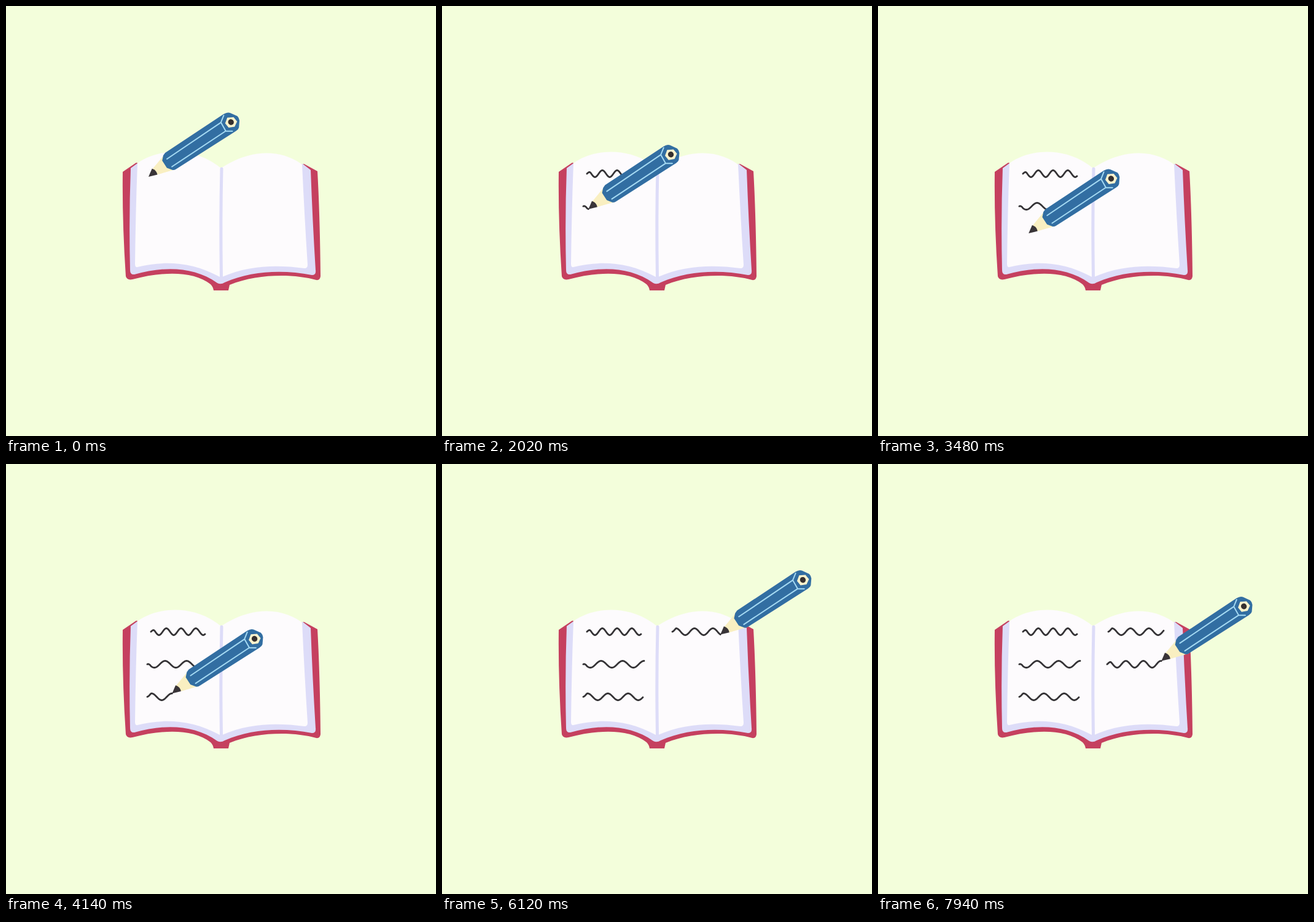
An HTML page that plays this animation: 700 px wide and 700 px high, repeating every 8 s.

```html
<!DOCTYPE html>
<html lang="en">
<head>
<meta charset="utf-8">
<title>Writing in a notebook</title>
<style>
  html, body { margin: 0; height: 100%; overflow: hidden; background: #f3fedb; }
  svg { display: block; width: 100vw; height: 100vh; }
  path { stroke-linecap: round; stroke-linejoin: round; }
  #ink { fill: none; stroke: #353336; stroke-width: 2.8; }
  .shine { fill: none; stroke: #a5daf3; stroke-width: 2; }
</style>
</head>
<body>
<svg viewBox="0 0 700 700">
  <!-- cover, page edges, pages, fold -->
  <path fill="#c5405f" d="M190 270L212 255L350 300L485 257L507 269Q511 340 512 440Q511 447 505 446C470 436 410 435 364 454L362 463H338Q337 457 333 453C305 431 255 432 206 445Q197 447 195 440Q189 350 190 270Z"/>
  <path fill="#dddcf8" d="M203 264L214 256L350 300L483 257L496 267Q499 350 504 430Q505 438 498 438C450 429 400 431 356 450Q350 454 344 451C305 423 255 424 209 437Q202 438 202 430Q200 345 203 264Z"/>
  <path fill="#fdfbfd" d="M214 256C245 233 305 227 350 264C395 234 445 231 482 258Q486 345 491 421Q491 427 486 427C440 421 395 422 352 441H348C300 415 255 415 214 425Q210 426 210 420Q211 335 214 256Z"/>
  <path fill="none" stroke="#dddcf8" stroke-width="5" d="M351 265Q349 350 350.500 441"/>
  <path id="ink"/>
  <!-- pencil lying along the x axis, tip at the origin -->
  <g id="pencil">
    <path fill="#f9efc1" d="M12 -7L44 -17V14L14 5Z"/>
    <path fill="#393438" d="M0 0L12 -8Q17 -2 14 5Z"/>
    <path fill="#326ea2" d="M44 -18L158 -19Q165 -19 168 -15L175 -4Q176 0 174 4L167 13Q165 15 160 15L44 14Q40 14 38 11L33 4V-10L39 -16Z"/>
    <path class="shine" d="M41 -8L147 -10M41 7L146 6M157 -17L147 -10L146 6L155 12"/>
    <path fill="#fbf3cd" d="M152 -5L160 -11L169 -6L170 3L162 8L153 4Z"/>
    <ellipse cx="161" cy="-1.500" rx="4.600" ry="4.800" fill="#35302f"/>
  </g>
</svg>
<script>
const LOOP = 8000;
const FIRST_ROW = 273, ROW_HEIGHT = 53, AMPLITUDE = 5.5;

// Writing interval, horizontal extent, and the first crest and spacing of the waves.
const lines = [
  { row: 0, from: 120, to: 1600, left: 236, right: 324, crest: 237, wave: 24 },
  { row: 1, from: 1920, to: 3120, left: 230, right: 329, crest: 259, wave: 35 },
  { row: 2, from: 3600, to: 4900, left: 230, right: 327, crest: 237, wave: 33 },
  { row: 0, from: 5200, to: 6260, left: 375, right: 465, crest: 381, wave: 30 },
  { row: 1, from: 6900, to: 7960, left: 373, right: 463, crest: 375, wave: 28.5 }
];

const ink = document.getElementById('ink');
const pencil = document.getElementById('pencil');
const ease = v => v * v * (3 - 2 * v);
const mix = (a, b, k) => a + (b - a) * k;

function pointOn(line, x) {
  const swell = Math.min(1, (x - line.left) / 6);
  const phase = 2 * Math.PI * (x - line.crest) / line.wave;
  return [x, FIRST_ROW + ROW_HEIGHT * line.row - AMPLITUDE * swell * Math.cos(phase)];
}

function draw(t) {
  let d = '', tip = [232, 278], restTime = 0;
  for (const line of lines) {
    if (t < line.from) {
      const k = ease((t - restTime) / (line.from - restTime));
      const next = pointOn(line, line.left);
      tip = tip.map((v, i) => mix(v, next[i], k));
      break;
    }
    const progress = Math.min(1, (t - line.from) / (line.to - line.from));
    const x = mix(line.left, line.right, progress);
    tip = pointOn(line, x);
    d += 'M' + pointOn(line, line.left);
    for (let px = line.left + 1; px < x; px++) d += 'L' + pointOn(line, px);
    d += 'L' + tip;
    if (t < line.to) break;
    restTime = line.to;
  }
  ink.setAttribute('d', d);
  pencil.setAttribute('transform', `translate(${tip}) rotate(-33)`);
}

const start = performance.now();
function frame() {
  draw((performance.now() - start) % LOOP);
  requestAnimationFrame(frame);
}
frame();
</script>
</body>
</html>
```
